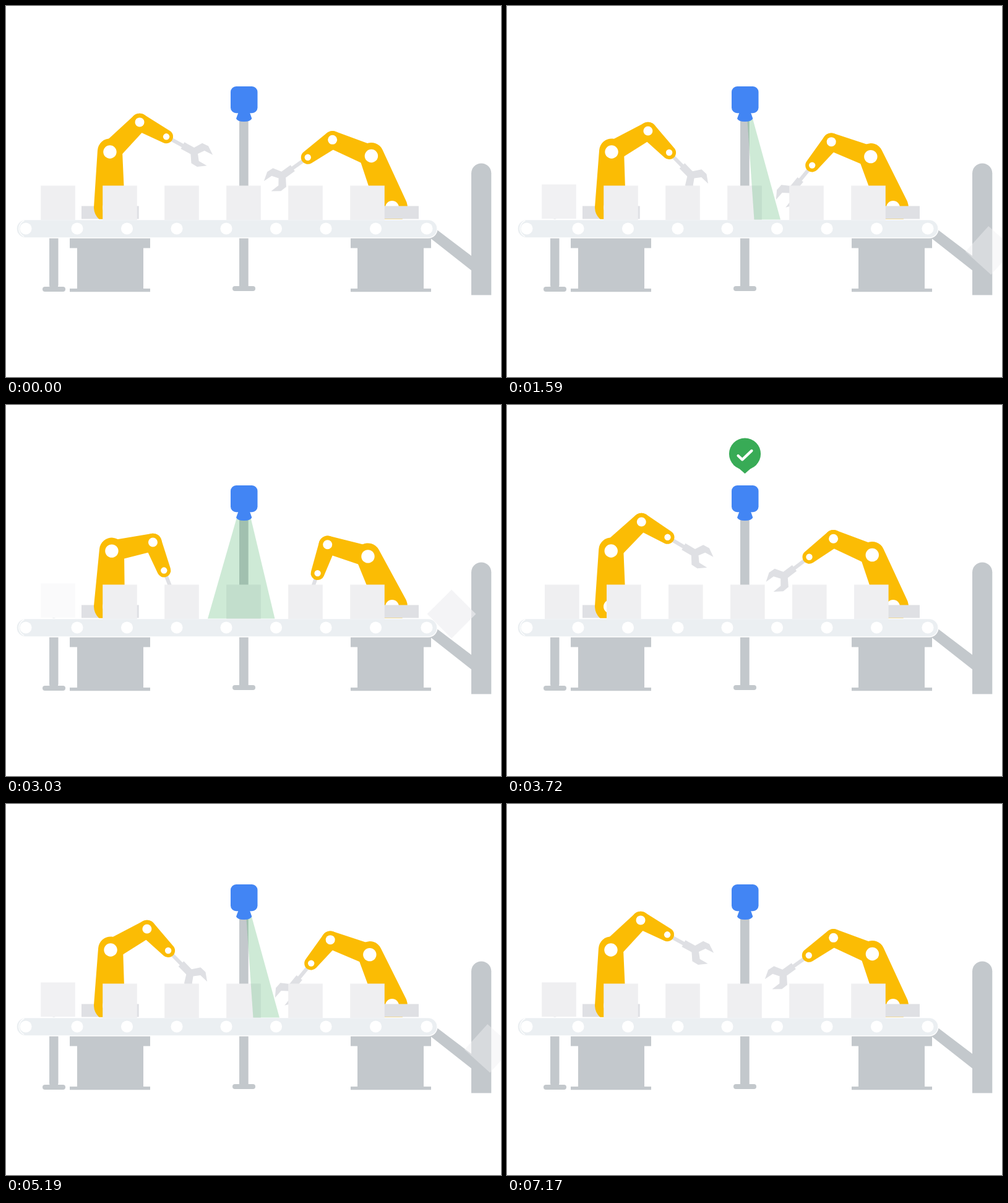
An HTML page with a canvas for the animation above (7200 ms loop, 800 by 600 pixels).

```html
<!DOCTYPE html>
<html>
<head>
<meta charset="utf-8">
<style>
html, body { margin: 0; width: 100%; height: 100%; overflow: hidden; background: #fff; }
canvas { display: block; }
</style>
</head>
<body>
<canvas id="stage" width="800" height="600"></canvas>
<script>
const c = document.getElementById('stage').getContext('2d');
const LOOP = 7200, CYCLE = 1800;
const GRAY = '#c3c8cc', PALE = '#dfe0e4', BOX = '#efeff1', BELT = '#ebeff2';
const YELLOW = '#fbbc04', BLUE = '#4285f4', GREEN = '#38ab56', RED = '#ea5b4c';

// Arm angles in degrees: base (from vertical), upper arm, forearm
const LEFT = {
  rest: [0.6, -45, 28.5], near: [3.2, -21.6, 65], low: [2.5, -12, 68.6],
  back: [1.3, -30, 45.8], high: [-7, -42, -1.2]
};
const RIGHT = {
  rest: [21.9, -22.6, 35.5], near: [24.3, -25.4, 64.5], low: [25.7, -16.3, 70.8],
  back: [23.7, -20.6, 50.8], high: [8.9, -29.2, -1.2]
};
const WORK = [[0, 'rest'], [750, 'near'], [1230, 'low'], [1590, 'back'], [1770, 'rest']];
const ALARM = [[0, 'rest'], [700, 'high'], [1020, 'high'], [1770, 'rest']];

// Smooth curve through [time, value] keys, flat at ends and extremes
function curve(t, keys) {
  const last = keys.length - 1;
  if (t <= keys[0][0]) return keys[0][1];
  if (t >= keys[last][0]) return keys[last][1];
  const slope = i => {
    if (i === 0 || i === last) return 0;
    const [t0, a] = keys[i - 1], b = keys[i][1], [t1, d] = keys[i + 1];
    return (b - a) * (d - b) <= 0 ? 0 : (d - a) / (t1 - t0);
  };
  let i = 0;
  while (t > keys[i + 1][0]) i++;
  const [ta, a] = keys[i], [tb, b] = keys[i + 1];
  const h = tb - ta, p = (t - ta) / h, q = 1 - p;
  return a * q * q * (1 + 2 * p) + b * p * p * (3 - 2 * p)
    + h * p * q * (q * slope(i) - p * slope(i + 1));
}

function ease(t, from, to) {
  const p = Math.min(1, Math.max(0, (t - from) / (to - from)));
  return (1 - Math.cos(Math.PI * p)) / 2;
}

function rect(x, y, w, h, color, r = 0) {
  c.fillStyle = color;
  c.beginPath();
  c.roundRect(x, y, w, h, r);
  c.fill();
}

function poly(color, ...pts) {
  c.fillStyle = color;
  c.beginPath();
  pts.forEach(([x, y]) => c.lineTo(x, y));
  c.fill();
}

function dot(x, y, r, color = '#fff') {
  c.fillStyle = color;
  c.beginPath();
  c.arc(x, y, r, 0, 7);
  c.fill();
}

// Tapered bar around two circles
function limb(x1, y1, r1, x2, y2, r2) {
  const a = Math.atan2(y2 - y1, x2 - x1);
  const b = Math.acos((r1 - r2) / Math.hypot(x2 - x1, y2 - y1));
  c.fillStyle = YELLOW;
  c.beginPath();
  c.arc(x1, y1, r1, a + b, a - b + 2 * Math.PI);
  c.arc(x2, y2, r2, a - b, a + b);
  c.fill();
}

function gripper(x, y, angle) {
  c.save();
  c.translate(x, y);
  c.rotate(angle);
  rect(8, -3, 24, 6, PALE);
  rect(30, -6, 20, 12, PALE);
  const half = [[48, -6], [56, -18.5], [67, -19], [80, -10], [65, -9.5], [58, 0]];
  const mirrored = half.slice(0, 5).reverse().map(([px, py]) => [px, -py]);
  poly(PALE, ...half, ...mirrored);
  c.restore();
}

function arm(x, flip, poses, t, keys) {
  const [base, upper, fore] = [0, 1, 2].map(i =>
    curve(t, keys.map(([time, name]) => [time, poses[name][i]])) * Math.PI / 180);
  const sx = 90 * Math.sin(base), sy = -90 * Math.cos(base);
  const ex = sx + 68 * Math.cos(upper), ey = sy + 68 * Math.sin(upper);
  const wx = ex + 49 * Math.cos(fore), wy = ey + 49 * Math.sin(fore);
  c.save();
  c.translate(x, 326);
  c.scale(flip, 1);
  gripper(wx, wy, fore);
  limb(0, 0, 25, sx, sy - 1.5, 20);
  limb(sx, sy, 17, ex, ey, 14.2);
  limb(ex, ey, 14.2, wx, wy, 11);
  dot(0, 0, 11);
  dot(sx, sy, 10.7);
  dot(ex, ey, 7.5);
  dot(wx, wy, 5.2);
  c.restore();
}

function stand(x, inset) {
  rect(x, 375, 130, 16.5, GRAY);
  rect(x + inset, 390, 107, 68, GRAY);
  rect(x, 457, 130, 5.3, GRAY);
}

function scenery() {
  rect(70, 344.5, 14.5, 114, GRAY, 7);
  rect(59, 454, 37, 8, GRAY, 4);
  rect(377, 180, 14.7, 276, GRAY);
  rect(366, 453, 37, 8, GRAY, 4);
  stand(103, 12);
  stand(557, 11);
  poly(GRAY, [694, 360], [752, 404], [752, 427.5], [684, 374]);
  rect(752, 254.5, 32.3, 213, GRAY, [16, 16, 0, 0]);
}

function belt() {
  rect(17, 345.5, 680, 29.5, BELT, 14.7);
  c.strokeStyle = '#fff';
  c.lineWidth = 1.3;
  c.stroke();
  c.beginPath();
  c.arc(35, 360, 14, 2, 4.3);
  c.stroke();
  [32, 115, 195.5, 276, 356, 436.5, 517, 597.5, 680].forEach(x => dot(x, 360, 9.6));
}

function fallingBox(t, shift) {
  const x = 584 + shift + curve(t, [[500, 0], [750, 11], [1020, 20], [1230, 36], [1350, 49], [1590, 96], [1740, 130]]);
  const y = curve(t, [[600, 318.2], [750, 320], [1020, 323.5], [1230, 338], [1350, 350], [1590, 395], [1740, 425]]);
  const turn = curve(t, [[750, 0], [1020, 27.5], [1230, 45], [1590, 42]]);
  c.save();
  c.globalAlpha = curve(t, [[1050, 1], [1230, 0.65], [1590, 0.45], [1740, 0]]);
  c.translate(x, y);
  c.rotate(turn * Math.PI / 180);
  rect(-27.8, -27.8, 55.6, 55.6, BOX);
  c.restore();
}

function boxes(t) {
  const shift = 100 * ease(t, 0, 860);
  for (let i = 0; i < 5; i++) rect(56.2 + i * 100 + shift, 290.4, 55.6, 55.6, BOX);
  fallingBox(t, shift);
  c.globalAlpha = curve(t, [[1110, 0], [1230, 0.3], [1590, 0.85], [1710, 1]]);
  rect(56.2, 288.4, 55.6, 55.6, BOX);
  c.globalAlpha = 1;
}

function beam(t) {
  const left = 116 * ease(t, 1380, 1740), right = 116 * ease(t, 930, 1290);
  if (right <= left) return;
  const top = v => [373 + v * 24 / 116, 182], foot = v => [326 + v, 345.5];
  poly('rgba(52,168,83,.24)', top(left), top(right), foot(right), foot(left));
}

function camera() {
  rect(363, 130, 43.5, 43.2, BLUE, 9);
  c.beginPath();
  c.moveTo(376, 171);
  c.lineTo(372, 182);
  c.quadraticCurveTo(374, 187, 384.6, 187);
  c.quadraticCurveTo(395, 187, 397.3, 182);
  c.lineTo(393.5, 171);
  c.fill();
}

function badge(t, bad) {
  const size = curve(t, [[0, 0], [150, 0.85], [330, bad ? 1.21 : 1.05], [700, 1]]);
  const alpha = 1 - ease(t, 1000, 1140);
  if (!size || !alpha) return;
  const color = bad ? RED : GREEN;
  c.save();
  c.globalAlpha = alpha;
  c.translate(384.5, 111);
  c.scale(size, size);
  dot(0, -45.2, 36.2, color);
  poly(color, [-16, -14], [0, 0], [16, -14]);
  c.strokeStyle = bad ? '#dadcdb' : '#fff';
  c.lineWidth = 6;
  c.lineCap = c.lineJoin = 'round';
  c.beginPath();
  if (bad) {
    c.moveTo(-11, -53);
    c.lineTo(11, -32);
    c.moveTo(11, -53);
    c.lineTo(-11, -32);
  } else {
    c.moveTo(-15.5, -41);
    c.lineTo(-6, -32);
    c.lineTo(15.5, -52.5);
  }
  c.stroke();
  c.restore();
}

function draw(now) {
  const time = now % LOOP, t = time % CYCLE;
  const bad = time >= 3 * CYCLE;
  const keys = bad ? ALARM : WORK;
  c.fillStyle = '#fff';
  c.fillRect(0, 0, 800, 600);
  scenery();
  rect(122, 323.4, 92.7, 21, PALE);
  arm(167, 1, LEFT, t, keys);
  arm(624, -1, RIGHT, t, keys);
  rect(574, 323.4, 93, 21, PALE);
  // Hide what reaches below the belt line
  belt();
  boxes(t);
  beam(t);
  camera();
  badge(t, bad);
}

const start = performance.now();
function tick() {
  draw(performance.now() - start);
  requestAnimationFrame(tick);
}
tick();
</script>
</body>
</html>
```
